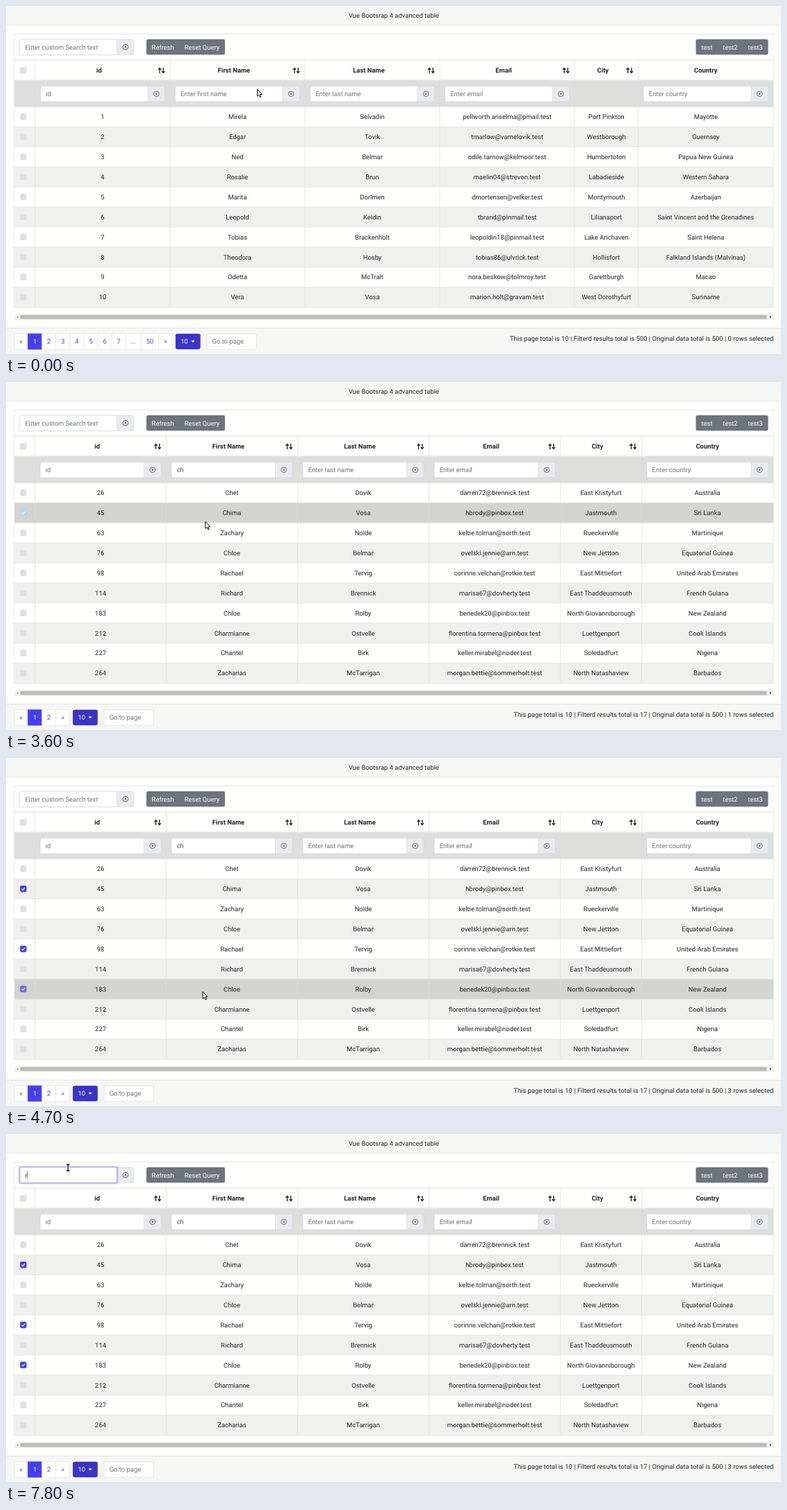
Write an HTML page that moves like this. It is 1115 px wide and 502 px high and loops after 8000 ms.

```html
<!DOCTYPE html>
<html>
<head>
<meta charset="utf-8">
<title>Advanced table</title>
<style>
html, body { margin: 0; width: 100%; height: 100%; overflow: hidden; background: #fffffd; }
svg { display: block; width: 1115px; height: 502px; }
text { font: 9.44px Roboto, sans-serif; fill: #212529; text-rendering: geometricPrecision; }
.bold { font-weight: 700; }
.hint { fill: #6c757d; }
.typed { fill: #495057; }
.light { fill: #fff; }
.link { fill: #443ff3; }
</style>
</head>
<body>
<svg id="stage" viewBox="0 0 1115 502"></svg>
<script>
const LOOP = 8000, TICK = 100;
const LEFT = 12, RIGHT = 1104;
const ROW_TOP = 145.4, ROW_H = 28.92;
const LINE = '#dcdfe0', PRIMARY = '#443ff3', PAPER = '#fffffd', BAR = '#f7f7f5';
const FILTER_AT = 1600;

const HEADS = ['id', 'First Name', 'Last Name', 'Email', 'City', 'Country'];
const HINTS = ['id', 'Enter first name', 'Enter last name', 'Enter email', '', 'Enter country'];

const parse = s => s.trim().split('\n').map(line => line.split('|'));
const ALL = {
  edges: [12, 42, 236, 430, 624, 818, 909.6, 1104],
  pages: ['«', 1, 2, 3, 4, 5, 6, 7, '...', 50, '»'],
  found: 500,
  rows: parse(`
1|Mirela|Selvadin|pellworth.anselma@pmail.test|Port Pinkton|Mayotte
2|Edgar|Tovik|tmarlow@varnelovik.test|Westborough|Guernsey
3|Ned|Belmar|odile.tarnow@kelmoor.test|Humbertoton|Papua New Guinea
4|Rosalie|Brun|maelin04@strevon.test|Labadieside|Western Sahara
5|Marita|Dorlmen|dmortensen@velker.test|Montymouth|Azerbaijan
6|Leopold|Keldin|tbrand@pinmail.test|Lilianaport|Saint Vincent and the Grenadines
7|Tobias|Brackenholt|leopoldin18@pinmail.test|Lake Arichaven|Saint Helena
8|Theodora|Hosby|tobias86@ulvrick.test|Hollisfort|Falkland Islands (Malvinas)
9|Odetta|McTralt|nora.beskow@tolmroy.test|Garettburgh|Macao
10|Vera|Vosa|marion.holt@gravam.test|West Dorothyfurt|Suriname`)
};
const FILTERED = {
  edges: [12, 41.6, 230.5, 419.5, 608.5, 797.6, 914.4, 1104],
  pages: ['«', 1, 2, '»'],
  found: 17,
  rows: parse(`
26|Chet|Dovik|darren72@brennick.test|East Kristyfurt|Australia
45|Chima|Vosa|hbrody@pinbox.test|Jastmouth|Sri Lanka
63|Zachary|Nolde|keltie.tolman@sorth.test|Rueckerville|Martinique
76|Chloe|Belmar|ovelski.jennie@arn.test|New Jettton|Equatorial Guinea
98|Rachael|Tervig|corinne.velchan@rotkie.test|East Mittiefort|United Arab Emirates
114|Richard|Brennick|marisa67@dovherty.test|East Thaddeusmouth|French Guiana
183|Chloe|Rolby|benedek20@pinbox.test|North Giovanniborough|New Zealand
212|Charmianne|Ostvelle|florentina.tormena@pinbox.test|Luettgenport|Cook Islands
227|Chantel|Birk|keller.mirabel@noder.test|Soledadfurt|Nigeria
264|Zacharias|McTarrigan|morgan.bettie@sommerholt.test|North Natashaview|Barbados`)
};

// Pointer keys: time, x, y of the arrow tip
const PATH = [
  [0, 361.5, 120], [2300, 361.5, 120], [2500, 346, 150], [2700, 310, 185],
  [2900, 291, 110], [3000, 288, 64], [3200, 286, 95], [3300, 286, 130],
  [3500, 286.5, 200.5], [3700, 287, 202], [3800, 289, 256], [3900, 289, 268],
  [4100, 289, 272], [4200, 288, 285], [4300, 285, 325], [4400, 283, 337],
  [4700, 283, 337], [4800, 281, 332], [4900, 265, 290], [5000, 225, 210],
  [5100, 170, 130], [5200, 115, 65], [5300, 88.5, 46], [LOOP, 88.5, 46]
];
const CLICKS = [{ row: 1, at: 3600 }, { row: 4, at: 3900 }, { row: 6, at: 4600 }];

const clamp = v => Math.max(0, Math.min(1, v));
const within = (t, a, b) => t >= a && t < b;

function pointerAt(t) {
  const i = Math.max(1, PATH.findIndex(k => k[0] >= t));
  const [a, b] = [PATH[i - 1], PATH[i]];
  const f = clamp((t - a[0]) / (b[0] - a[0]));
  return [a[1] + (b[1] - a[1]) * f, a[2] + (b[2] - a[2]) * f];
}

const rect = (x, y, w, h, fill, more = '') =>
  `<rect x="${x}" y="${y}" width="${w}" height="${h}" fill="${fill}" ${more}/>`;
const path = (d, stroke, width, more = '') =>
  `<path d="${d}" fill="none" stroke="${stroke}" stroke-width="${width}" ${more}/>`;
const text = (x, cy, s, cls = '', anchor = 'middle') =>
  `<text x="${x}" y="${cy + 3.3}" class="${cls}" text-anchor="${anchor}">${s}</text>`;
const hline = (y, w = 0.7, x1 = LEFT, x2 = RIGHT) => path(`M${x1} ${y}H${x2}`, LINE, w);
const vline = (x, y1, y2) => path(`M${x} ${y1}V${y2}`, LINE, 0.7);

function field(x, right, cy, { hint, value = '', focus = 0, caret = 0, addon = true }) {
  const w = right - x - (addon ? 24.5 : 0), y = cy - 11.2, h = 22.4;
  const edge = 'stroke="#ced4da" stroke-width=".6" rx="2.2"';
  let s = '';
  if (addon) {
    const cx = right - 12.2;
    s += rect(x, y, right - x, h, '#e9ecef', edge);
    s += `<circle cx="${cx}" cy="${cy}" r="3.9" fill="none" stroke="#495057" stroke-width=".75"/>`;
    s += path(`M${cx - 1.5} ${cy - 1.6}l3 3.2m0-3.2l-3 3.2`, '#495057', 0.85);
  }
  s += rect(x, y, w, h, PAPER, edge);
  if (focus) {
    s += `<g opacity="${focus}">` +
      rect(x - 1.1, y - 1.1, w + 2.2, h + 2.2, 'none', `stroke="${PRIMARY}" stroke-opacity=".27" stroke-width="1.8" rx="3"`) +
      rect(x, y, w, h, 'none', 'stroke="#a19ef8" stroke-width=".7" rx="2.2"') + '</g>';
  }
  s += text(x + 7.6, cy, value || hint, value ? 'typed' : 'hint', 'start');
  if (caret) {
    const cx = x + 7.8 + ({ c: 5, ch: 10.2, r: 3.3 }[value] || 0);
    s += path(`M${cx} ${cy - 5.6}v11.2`, '#343a40', 0.7, `opacity="${caret}"`);
  }
  return s;
}

function checkbox(cy, t, click) {
  const age = click ? t - click.at : -1;
  const fill = age < 0 ? '#dce0e5' : age < 100 ? '#b3d7ff' : age < 200 ? '#6a68f5' : PRIMARY;
  let s = rect(20.2, cy - 4.7, 9.4, 9.4, fill, 'rx="2.3"');
  if (age >= 0) s += path(`M22.7 ${cy + .1}l1.5 1.6l3-3.4`, '#fff', 1.2);
  return s;
}

function sortIcon(x, y) {
  return path(`M${x - 2.6} ${y + 4}v-7.4m-2.1 2.3l2.1-2.4l2.1 2.4` +
    `M${x + 2.6} ${y - 4}v7.4m-2.1-2.3l2.1 2.4l2.1-2.4`, '#212529', 1.35);
}

function toolbar(t) {
  const focus = clamp((t - 5600) / 300);
  const caret = within(t, 5700, 6400) || t >= 7600 ? 1 : t >= 7500 ? 0.5 : 0;
  const value = t >= 7800 ? 'r' : '';
  return hline(40.6) +
    field(19.8, 184, 59.2, { hint: 'Enter custom Search text', value, focus, caret }) +
    rect(202, 48, 113, 22.3, '#6c757d', 'rx="2.4"') +
    text(225.7, 59.2, 'Refresh', 'light') + text(282, 59.2, 'Reset Query', 'light') +
    rect(992.5, 48, 104, 22.3, '#6c757d', 'rx="2.4"') +
    text(1008.5, 59.2, 'test', 'light') + text(1042, 59.2, 'test2', 'light') +
    text(1078, 59.2, 'test3', 'light');
}

function nameField(t) {
  return {
    value: t >= FILTER_AT ? 'ch' : t >= 1400 ? 'c' : '',
    focus: t < 3500 ? clamp((t - 300) / 300) : t < 3600 ? 0.4 : 0,
    caret: within(t, 400, 1000) || within(t, 1400, 2100) ? 1 : 0
  };
}

function table(view, t) {
  const e = view.edges, bottom = ROW_TOP + 10 * ROW_H;
  const y = pointerAt(t + TICK)[1];   // row highlight runs ahead of the drawn pointer
  const hover = t >= 2400 ? Math.floor((y - ROW_TOP) / ROW_H) : -1;
  let s = rect(LEFT, 107.3, RIGHT - LEFT, ROW_TOP - 107.3, '#dededd');
  view.rows.forEach((_, i) => {
    const fill = i === hover ? '#d4d4d1' : i % 2 ? '#f0f0ee' : PAPER;
    s += rect(LEFT, ROW_TOP + i * ROW_H, RIGHT - LEFT, ROW_H, fill);
  });
  s += hline(78, 1.2) + hline(107, 0.9);
  for (let i = 0; i <= 10; i++) s += hline(ROW_TOP + i * ROW_H);
  e.forEach((x, i) => s += vline(x, i % 7 ? 78 : 40.6, bottom));

  s += checkbox(93, t);
  HEADS.forEach((head, c) => {
    const left = e[c + 1], right = e[c + 2], mid = (left + right) / 2, sorts = c < 5;
    s += text(sorts ? mid - 5 : mid, 93, head, 'bold');
    if (sorts) s += sortIcon(right - 12.3, 93);
    if (HINTS[c]) s += field(left + 7.6, right - 7.5, 126.8, { hint: HINTS[c], ...(c === 1 ? nameField(t) : {}) });
    view.rows.forEach((row, i) => s += text(mid, ROW_TOP + (i + .5) * ROW_H - .1, row[c]));
  });
  view.rows.forEach((_, i) =>
    s += checkbox(ROW_TOP + (i + .5) * ROW_H - .1, t, CLICKS.find(k => k.row === i)));
  return s;
}

function scrollbar() {
  return rect(LEFT, 444.4, RIGHT - LEFT, 8.4, '#f2f2f0') +
    rect(20.8, 445.6, 1073.8, 6, '#bdbdbc') +
    '<path d="M17.3 446.8v3.6l-2.2-1.8z" fill="#a3a3a3"/>' +
    '<path d="M1099 446.6v4l2.4-2z" fill="#444"/>';
}

function footer(view, t) {
  const cy = 484, y = 472.8, h = 22.4;
  const widths = { '«': 19.6, '»': 19.6, '...': 22, 50: 25.3 };
  let s = rect(0, 464.8, 1115, 38, BAR) + hline(464.6, 0.7, 0, 1115);
  let x = LEFT;
  for (const p of view.pages) {
    const w = widths[p] || 20.1, on = p === 1;
    s += rect(x, y, w, h, on ? PRIMARY : PAPER, `stroke="${on ? PRIMARY : '#dee2e6'}" stroke-width=".6"`);
    s += text(x + w / 2, cy, p, on ? 'light' : 'link');
    x += w;
  }
  x += 4.7;
  s += rect(x, y, 35.8, h, '#3a34c8', 'rx="2.4"') + text(x + 12.6, cy, 10, 'light');
  s += `<path d="M${x + 22.2} ${cy - 1.4}h5.6l-2.8 2.8z" fill="#fff"/>`;
  s += field(x + 45, x + 116.5, cy, { hint: 'Go to page', addon: false });
  const picked = CLICKS.filter(k => t >= k.at).length;
  return s + text(RIGHT + .4, 480, `This page total is 10 | Filterd results total is ${view.found}` +
    ` | Original data total is 500 | ${picked} rows selected`, '', 'end');
}

function pointer(t) {
  const [x, y] = pointerAt(t);
  if (within(t, 400, 2400) || t >= 5600) {
    const d = `M${x - 1.6} ${y - 2}h4.8m-2.4 0v9m-2.4 0h4.8`;
    return path(d, '#fff', 2.2, 'opacity=".6"') + path(d, '#111', 1.3);
  }
  return `<path transform="translate(${x} ${y})" d="M0 0V10.2L2.3 8.2L3.9 11.7L5.5 11L4 7.6H7.1Z"` +
    ' fill="#fff" stroke="#111" stroke-width="1" stroke-linejoin="round"/>';
}

const stage = document.getElementById('stage');
function draw(t) {
  const view = t < FILTER_AT ? ALL : FILTERED;
  stage.innerHTML = rect(0, 0, 1115, 502, PAPER) +
    rect(0, 0, 1115, 27.6, BAR) + hline(27.7, 0.7, 0, 1115) +
    text(558, 14, 'Vue Bootsrap 4 advanced table') +
    table(view, t) + toolbar(t) + scrollbar() + footer(view, t) + pointer(t);
}

let start = null, shown = -1;
function frame(now) {
  if (start === null) start = now;
  const t = Math.floor(((now - start) % LOOP) / TICK) * TICK;
  if (t !== shown) draw(shown = t);
  requestAnimationFrame(frame);
}
draw(0);
requestAnimationFrame(frame);
</script>
</body>
</html>
```
